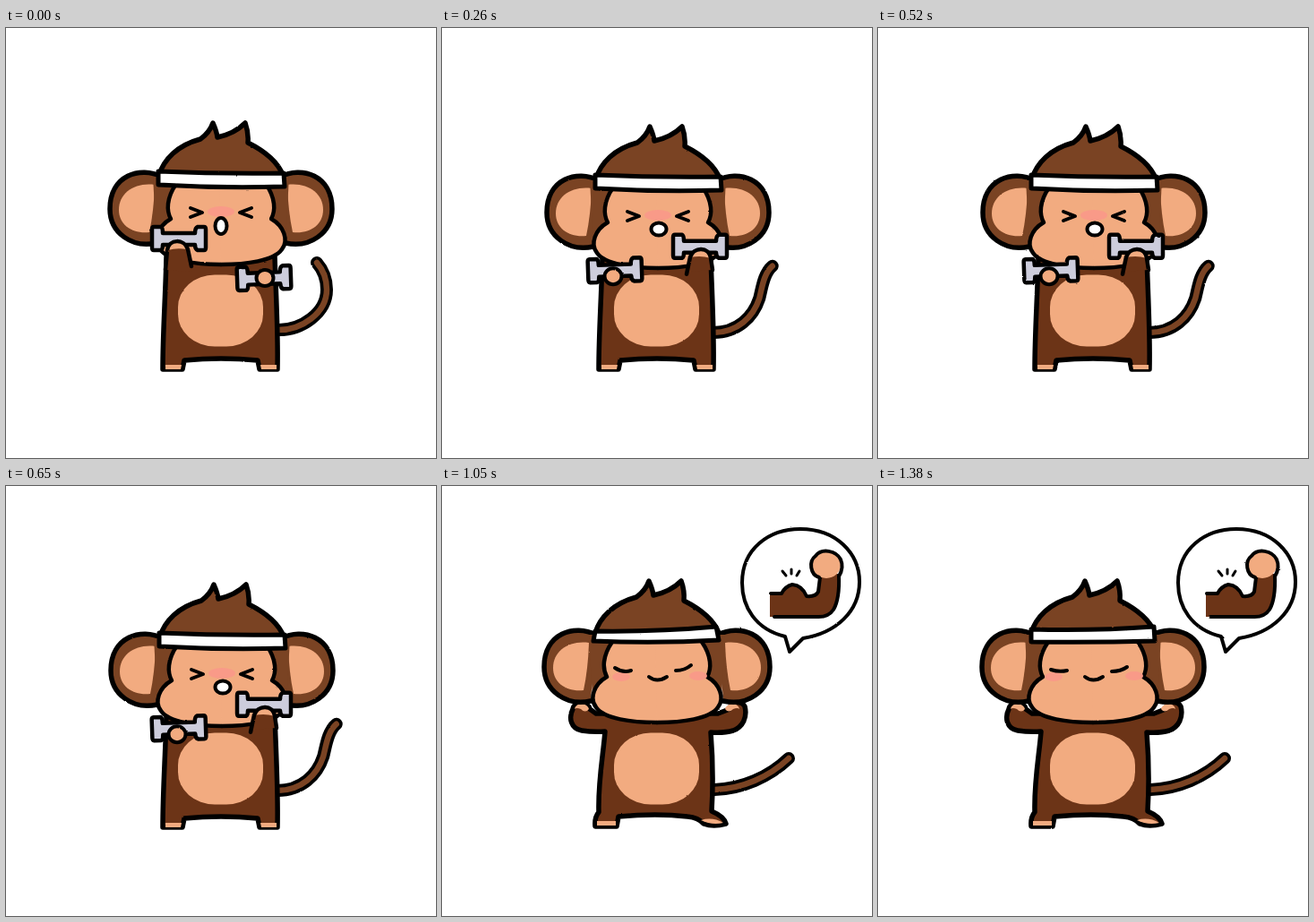
Recreate the animation shown at these times as an HTML page. Size 480x480 px, loop 1450 ms.

```html
<!DOCTYPE html>
<html>
<head>
<meta charset="utf-8">
<style>
  html, body { margin: 0; width: 100%; height: 100%; overflow: hidden; background: #fff; }
  svg { display: block; width: 100vw; height: 100vh; }
</style>
</head>
<body>
<svg viewBox="0 0 480 480">
  <filter id="rough" filterUnits="userSpaceOnUse" x="0" y="0" width="480" height="480" color-interpolation-filters="sRGB">
    <feTurbulence id="noise" type="fractalNoise" baseFrequency=".25"/>
    <feDisplacementMap in="SourceGraphic" scale="1.8" xChannelSelector="R" yChannelSelector="G"/>
  </filter>
  <g id="stage" filter="url(#rough)" stroke-linecap="round" stroke-linejoin="round"></g>
</svg>
<script>
const LOOP = 1450, FRAMES = 22, LIFT_FRAMES = 12, CYCLE = 6;
const FUR = '#7a4323', BODY = '#6c3417', SKIN = '#f2ab80', METAL = '#cdcddc', BLUSH = '#f99a88';
const stage = document.getElementById('stage');
const noise = document.getElementById('noise');

const path = (d, fill = 'none', width = 0) =>
  `<path d="${d}" fill="${fill}" stroke="${width ? '#000' : 'none'}" stroke-width="${width}"/>`;
const oval = (x, y, rx, ry, fill, width = 0) =>
  `<ellipse cx="${x}" cy="${y}" rx="${rx}" ry="${ry}" fill="${fill}" stroke="${width ? '#000' : 'none'}" stroke-width="${width}"/>`;
const group = (transform, content) => `<g transform="${transform}">${content}</g>`;
const mirror = content => group('matrix(-1 0 0 1 480 0)', content);
const both = content => content + mirror(content);

const belly = `<rect x="192" y="275.5" width="95" height="80" rx="41" ry="36" fill="${SKIN}"/>`;

function tail(d) {
  return path(d, 'none', 14) + `<path d="${d}" fill="none" stroke="${FUR}" stroke-width="6.5"/>`;
}

function head(band, earShift) {
  const ear = group(`translate(${earShift} 0)`,
    path('M174 166C150 154 116 164 116 202C116 229 141 246 168 240', FUR, 5.5) +
    path('M166 175C144 172 126 184 126 203C126 220 141 230 160 228Q165 205 166 175', SKIN));
  const halfFace = 'M190 174C179 190 179 204 184 213C170 221 164 237 172 247C181 260 212 264 240 264';
  return both(ear) +
    path('M164 166H316L312 238H168Z', FUR) +
    path('M171 164C176 147 191 131 217 124Q227 117 231 106Q235 115 236 122Q255 118 267 106Q271 117 270 128C290 138 303 149 309 164Z', FUR, 5.5) +
    both(path(halfFace + 'L242 174Z', SKIN) + path(halfFace, 'none', 4.5)) +
    path(band, '#fff', 5);
}

function dumbbell(x, y, tilt) {
  return group(`translate(${x} ${y}) rotate(${tilt})`,
    path('M-28 -13H-20Q-18 -12 -18 -6H18Q18 -12 21 -13H28Q30 -13 30 -10V10Q30 13 28 13H21Q18 12 18 7H-18Q-18 12 -20 13H-28Q-30 13 -30 10V-10Q-30 -13 -28 -13Z', METAL, 4.5));
}

// lift: 0 is lowered, 1 is raised
function arm(right, lift) {
  const y = 279 - 44 * lift, side = right ? mirror : s => s;
  const weight = dumbbell(right ? 288 : 193, y, lift > .5 ? 0 : -2);
  if (lift < .5) return weight + side(oval(191, y + (lift ? 7 : 0), 9.5, 9, SKIN, 4));
  const shape = `M178 270L180 ${y + 13}C182 ${y} 199 ${y} 203 ${y + 12}L207 ${y + 31}`;
  return weight + side(
    path(shape + 'L206 272Z', BODY) +
    path(`M181 ${y + 13}C183 ${y} 198 ${y} 202 ${y + 12}Q190 ${y + 10} 181 ${y + 13}`, SKIN) +
    path(shape, 'none', 4.5));
}

function lifting(phase) {
  const swing = (1 - Math.cos(phase * 2 * Math.PI / CYCLE)) / 2;
  const mid = phase % 3 !== 0;
  const lift = mid ? (swing < .5 ? .8 : .2) : 1 - swing;
  const mix = (a, b) => a + (b - a) * swing;
  const pt = (x0, y0, x1, y1) => `${mix(x0, x1)} ${mix(y0, y1)} `;
  const curve = 'M' + pt(302, 337, 302, 341) + 'C' + pt(330, 338, 330, 341) + pt(358, 318, 344, 324) +
    pt(358, 292, 353, 305) + 'C' + pt(358, 280, 357, 293) + pt(354, 270, 361, 275) + pt(347, 262, 376, 267);
  const eye = path('M206 201L219 206L206 211', 'none', 4);
  return tail(curve) +
    path('M179 255C178 300 175 340 175 381H197L199 371Q240 367 281 371L283 381H303C304 340 301 290 300 255Z', BODY, 5.5) +
    both(path('M178 376H196L195 381H178Z', SKIN)) + belly +
    group(mid ? 'translate(1 4)' : 'translate(0 0)',
      head('M170 160Q240 163 310 162L311 177Q240 179 170 175Z', 0) +
      both(eye) + oval(240, 205, 15, 6, BLUSH) +
      (mid ? oval(241, 220.5, 8.5, 7, '#fff', 4) : oval(240, 221, 6.5, 9, '#fff', 4))) +
    arm(false, lift) + arm(true, 1 - lift);
}

const bubble =
  path('M383 168C350 160 335 135 335 108C335 70 365 48 400 48C440 48 466 75 466 107C466 140 440 164 403 170L388 185Z', '#fff', 4) +
  path('M366 120V146H418Q431 147 437 138Q444 126 443 98H424L420 118Q417 124 407 123Q402 111 391 110Q383 112 379 120Z', BODY) +
  path('M367 120L379 120Q383 112 391 110Q402 111 407 123Q417 124 420 118L422 102M443 100Q444 126 437 138Q431 147 418 146H371', 'none', 4) +
  oval(429, 88, 16, 15, SKIN) +
  path('M421 102C411 99 409 84 417 78C424 69 440 72 445 82Q449 91 443 101', 'none', 4) +
  path('M380 95L384 100M390 93V98M399 95L396 100', 'none', 3);

function flexing(alt) {
  const body = 'M172 254L165 249C163 240 148 239 146 249C141 259 144 271 156 273Q169 275 182 274C180 300 174 330 175 364' +
    'Q170 370 171 380H195L197 369Q240 365 274 369Q286 370 292 377Q303 381 317 377Q315 369 301 363C303 330 302 300 300 275' +
    'Q315 276 325 273C336 269 341 258 338 246C334 239 323 240 321 249L308 254Z';
  const band = alt
    ? 'M171 160Q240 162 308 157L309 173Q240 175 171 174Z'
    : 'M171 162Q240 163 306 157L309 172Q240 176 169 173Z';
  return tail('M304 339C335 338 365 325 387 304') + path(body, BODY, 5.5) +
    both(path('M148 249C150 241 162 242 164 249Q160 254 155 249Q150 247 148 249', SKIN)) +
    path('M173 374H194V379H173Z', SKIN) + path('M289 373Q302 369 314 376Q301 379 289 373', SKIN) + belly +
    head(band, alt ? 0 : -2) +
    oval(alt ? 196 : 200, 213, 10, 5, BLUSH) + oval(286, 212, 10, 5, BLUSH) +
    path(alt ? 'M193 205Q202 208 211 206M261 207Q271 207 278 202' : 'M193 203Q202 209 211 206M261 206Q271 206 278 200', 'none', 4) +
    path('M231 213Q240 220 251 213', 'none', 4) + bubble;
}

let start, shown;
function tick(now) {
  start ??= now;
  // frames begin on whole hundredths of a second
  const hundredths = Math.floor((now - start) % LOOP / 10);
  const frame = Math.ceil((hundredths + 1) * FRAMES * 10 / LOOP) - 1;
  if (frame !== shown) {
    shown = frame;
    const lift = frame < LIFT_FRAMES;
    const pose = frame % (lift ? CYCLE : 2);
    noise.setAttribute('seed', lift ? pose : CYCLE + pose);
    stage.innerHTML = lift ? lifting(pose) : flexing(pose);
  }
  requestAnimationFrame(tick);
}
requestAnimationFrame(tick);
</script>
</body>
</html>
```
